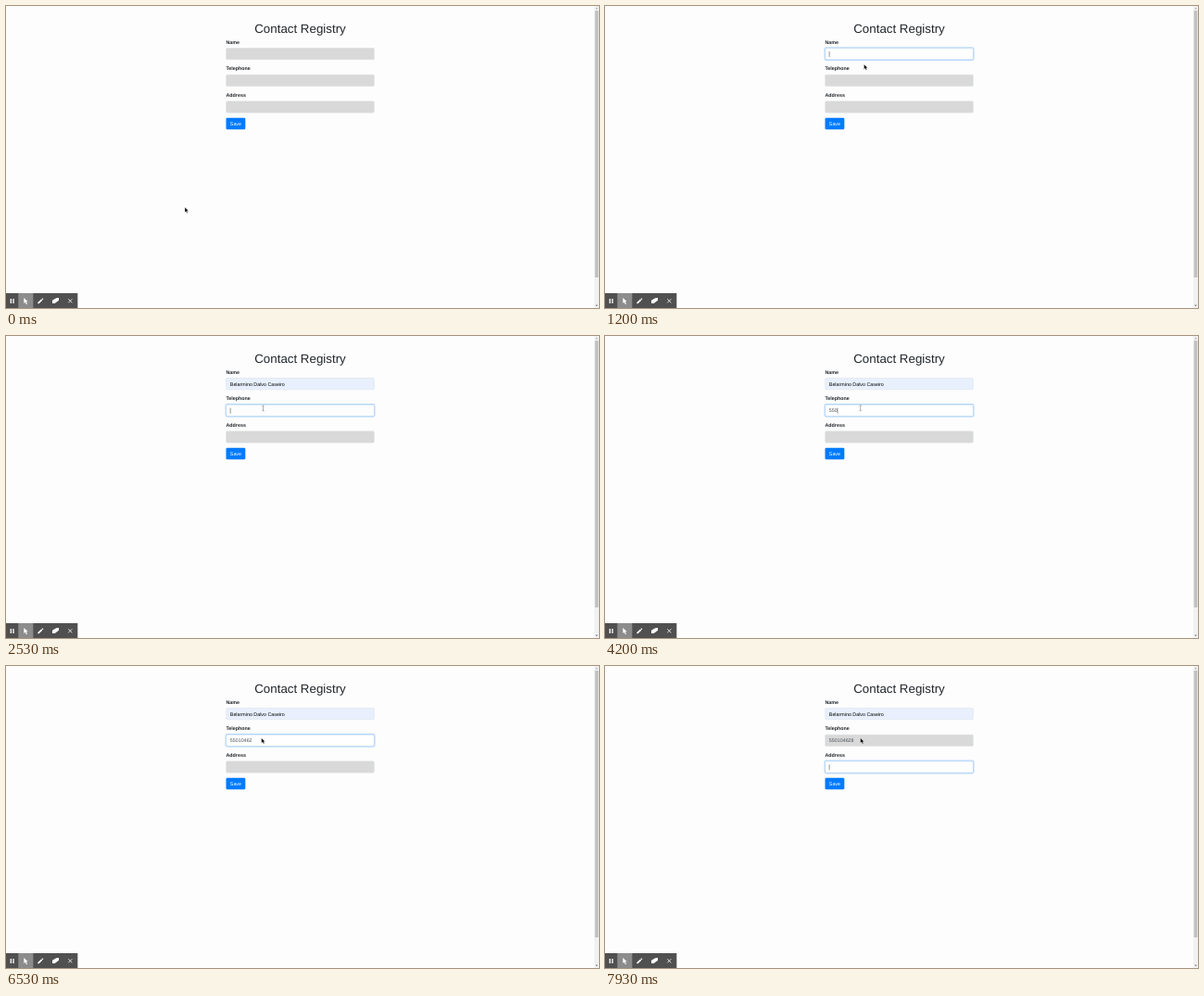
An HTML page for the animation above (8 s loop, 640 px wide and 326 px high).

```html
<!DOCTYPE html>
<html lang="en">
<head>
<meta charset="utf-8">
<title>Contact Registry</title>
<style>
  html, body { margin: 0; width: 100%; height: 100%; overflow: hidden; background: #fdfdfd; }
  svg { display: block; width: 640px; height: 326px; }
  text { font: 16px "Liberation Sans", Arial, sans-serif; fill: #212529; text-rendering: geometricPrecision; }
  .title { font-size: 40px; text-anchor: middle; }
  .label { font-weight: bold; }
  .value { fill: #495057; }
</style>
</head>
<body>
<!-- The page is laid out at 1920 wide and shown at a third of that. -->
<svg id="stage" viewBox="0 0 1920 978">
  <rect width="1920" height="978" fill="#fdfdfd"/>
  <text class="title" x="952.5" y="86">Contact Registry</text>
  <g id="form"></g>
  <path id="squiggle" fill="none" stroke="#e03030" stroke-width="1.5"/>
  <rect id="caret" width="1.4" height="18" fill="#222"/>
  <rect x="712.5" y="362" width="62.5" height="38" rx="4" fill="#007bff"/>
  <text x="725.5" y="387" style="fill:#fff">Save</text>

  <g id="scrollbar">
    <rect x="1905" width="15" height="978" fill="#f1f1f1"/>
    <rect x="1907" y="15" width="11" height="864" fill="#c1c1c1"/>
    <path d="M1908.5 9.500l4-4 4 4z" fill="#a3a3a3"/>
    <path d="M1908.500 968l4 4 4-4z" fill="#505050"/>
  </g>

  <g id="toolbar" fill="#fff">
    <rect y="930" width="232" height="48" fill="#505050"/>
    <rect x="40" y="930" width="48" height="48" fill="#8c8c8c"/>
    <path d="M14 948h4v15h-4zM22 948h4v15h-4z"/>
    <path d="M58 945v18l4-4 4 8 3-1.500-4-8h6z"/>
    <path transform="translate(100 943)" d="M3 17.250V21h3.750L17.810 9.940l-3.750-3.750zM20.700 7a1 1 0 0 0 0-1.400l-2.300-2.300a1 1 0 0 0-1.400 0l-1.900 1.800 3.750 3.750z"/>
    <path d="M150 953l13-7 8-1v8l-13 10h-8z"/>
    <path d="M202 949l12 12m0-12l-12 12" stroke="#fff" stroke-width="2.500"/>
  </g>

  <path id="arrow" d="M0 0v16.500l3.800-3.600 2.700 6 3-1.300-2.700-5.800h5.200z" fill="#000" stroke="#fff"/>
  <path id="beam" d="M-3.500-8.500h2.500l1 1 1-1h2.500M0-7.500v15M-3.500 8.500h2.500l1-1 1 1h2.500" fill="none" stroke="#444" stroke-width="1.300"/>
</svg>
<script>
const LOOP = 8000, LEFT = 712.5, WIDTH = 480, HEIGHT = 38, TEXT_X = LEFT + 13;
const NAME = 'Belarmino Dalvo Caseiro', PHONE = '550104628';
const PREVIEW = 1260, FILLED = 1920, ARROW_BACK = 4860;
const KEYS = [3655, 3925, 4190, 4520, 4930, 5260, 5600, 5960, 6730];

const $ = id => document.getElementById(id);
const clamp = v => Math.max(0, Math.min(1, v));
const ease = v => { v = clamp(v); return v * v * (3 - 2 * v); };
const show = (el, on) => el.setAttribute('visibility', on ? 'visible' : 'hidden');

function add(parent, tag, attrs, text = '') {
  const el = document.createElementNS('http://www.w3.org/2000/svg', tag);
  for (const key in attrs) el.setAttribute(key, attrs[key]);
  el.textContent = text;
  return parent.appendChild(el);
}

function box(parent, y, grow, attrs) {
  return add(parent, 'rect', {
    x: LEFT - grow, y: y - grow, width: WIDTH + 2 * grow, height: HEIGHT + 2 * grow, rx: 4 + grow, ...attrs
  });
}

// Each field gains focus at `on` and loses it at `off`; its caret blinks from `blink`.
const fields = [
  { label: 'Name', on: 930, off: 2400, blink: 1000 },
  { label: 'Telephone', on: 2400, off: 7300, blink: 2560 },
  { label: 'Address', on: 7300, off: Infinity, blink: 7500 }
];
fields.forEach((f, i) => {
  f.y = 136 + 86 * i;
  add($('form'), 'text', { class: 'label', x: LEFT, y: f.y - 14 }, f.label);
  f.base = box($('form'), f.y, -.5, { stroke: '#ced4da' });
  f.glow = add($('form'), 'g', {});
  box(f.glow, f.y, 1.6, { fill: 'none', stroke: '#007bff', 'stroke-opacity': .25, 'stroke-width': 3.2 });
  f.face = box(f.glow, f.y, -.5, { stroke: '#80bdff' });
  f.value = add($('form'), 'text', { class: 'value', x: TEXT_X, y: f.y + 25 });
});
fields[0].value.style.fill = '#000';

let wave = 'M802 163.500';
for (let i = 0; i < 10; i++) wave += `q1 ${i % 2 ? -3 : 3} 4.100 0`;
$('squiggle').setAttribute('d', wave);

// Pointer stops: time, x, y in stage pixels.
const path = [
  [60, 193, 217.3], [830, 278.5, 54], [1000, 278.5, 54], [1330, 280, 67.5],
  [1930, 280, 67.5], [2330, 277.5, 78], [2530, 277.5, 78], [2730, 275.7, 77.8]
];
function pointerAt(t) {
  let i = 0;
  while (i < path.length - 2 && t > path[i + 1][0]) i++;
  const [t0, x0, y0] = path[i], [t1, x1, y1] = path[i + 1];
  const k = ease((t - t0) / (t1 - t0));
  return [3 * (x0 + (x1 - x0) * k), 3 * (y0 + (y1 - y0) * k)];
}

function drawFields(t) {
  const typed = KEYS.filter(k => k <= t).length;
  const texts = [t >= PREVIEW ? NAME : '', PHONE.slice(0, typed), ''];
  fields.forEach((f, i) => {
    const autofill = i === 0 && t >= PREVIEW;
    f.base.setAttribute('fill', autofill ? '#e8f0fe' : '#d9d9d9');
    f.face.setAttribute('fill', autofill ? '#e8f0fe' : '#fff');
    f.glow.setAttribute('opacity', ease((t - f.on) / 150) - ease((t - f.off) / 150));
    if (f.value.textContent !== texts[i]) f.value.textContent = texts[i];
  });
  show($('squiggle'), t >= FILLED && t < fields[0].off);
  drawCaret(t, typed);
}

function drawCaret(t, typed) {
  const f = fields.find(f => t >= f.on && t < f.off);
  let blink = f ? f.blink : 0;
  if (f === fields[0] && t >= FILLED) blink = FILLED;
  if (f === fields[1] && typed) blink = KEYS[typed - 1];
  const previewing = t >= PREVIEW && t < FILLED;
  show($('caret'), f && !previewing && (t - blink) % 1000 < 500);
  if (!f) return;
  const length = f.value.textContent ? f.value.getComputedTextLength() : 0;
  $('caret').setAttribute('x', TEXT_X + length);
  $('caret').setAttribute('y', f.y + 11);
}

function drawPointer(t) {
  const [x, y] = pointerAt(t);
  const inField = x > LEFT && fields.some(f => y > f.y && y < f.y + HEIGHT);
  const beam = inField && t < ARROW_BACK;
  for (const id of ['arrow', 'beam']) {
    $(id).setAttribute('transform', `translate(${x} ${y})`);
    show($(id), beam === (id === 'beam'));
  }
}

const start = performance.now();
function frame() {
  const t = (performance.now() - start) % LOOP;
  drawFields(t);
  drawPointer(t);
  requestAnimationFrame(frame);
}
frame();
</script>
</body>
</html>
```
